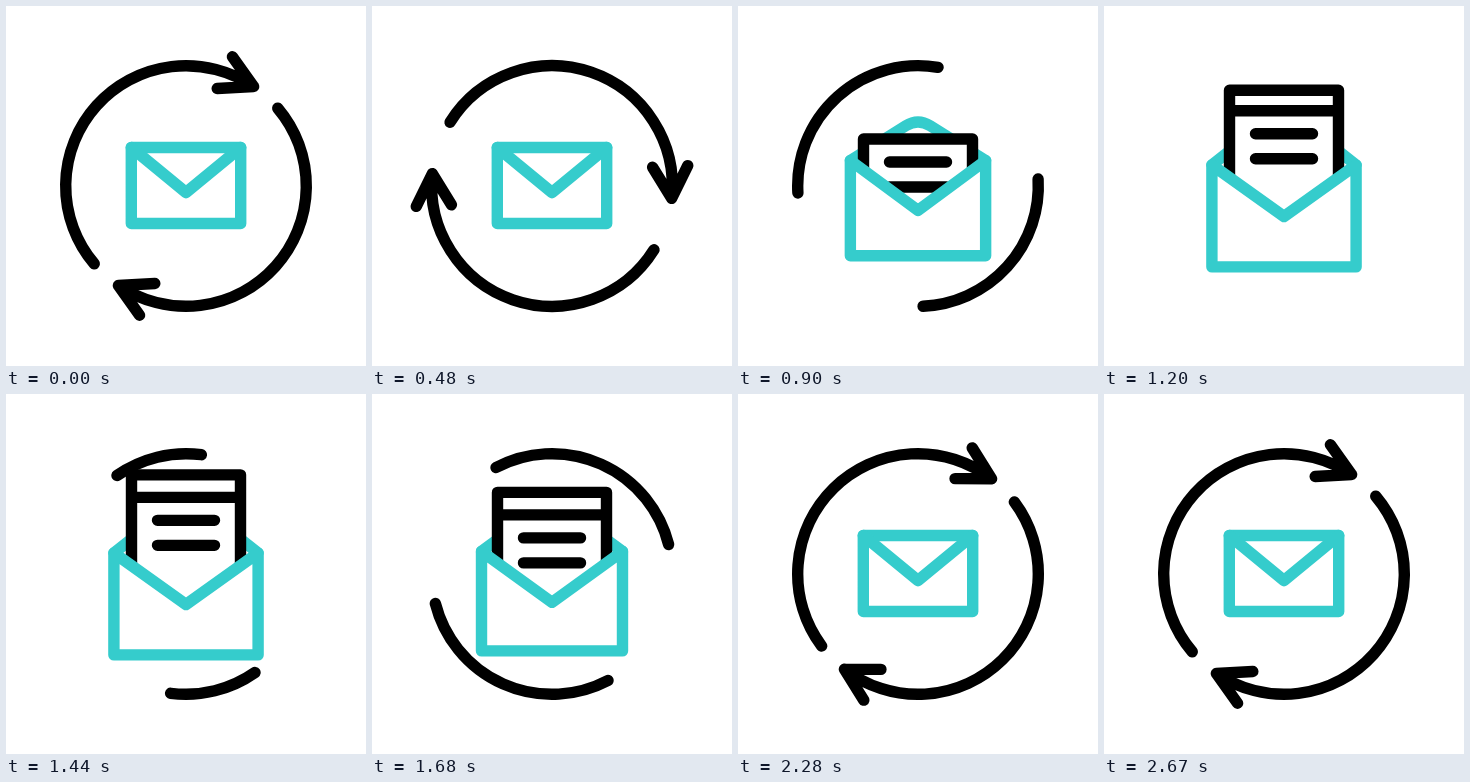
These frames come from a looping animation (360x360 px, 2700 ms). An HTML page:

```html
<!DOCTYPE html>
<html lang="en">
<head>
<meta charset="utf-8">
<title>Mail sync</title>
<style>
  html, body { margin: 0; width: 100%; height: 100%; overflow: hidden; background: #fff; }
  svg { display: block; width: 100%; height: 100%; }
  path { fill: none; stroke: #000; stroke-width: 11.4; stroke-linecap: round; stroke-linejoin: round; }
  .teal { stroke: #35cccc; }
  .solid { fill: #fff; }
  #sheet { stroke-linecap: butt; }
</style>
</head>
<body>
<svg viewBox="0 0 360 360">
  <path id="arcA"/>
  <path id="arcB"/>
  <path id="flap" class="teal solid"/>
  <g id="paper">
    <path id="sheet" class="solid"/>
    <path id="lines"/>
  </g>
  <path id="body" class="teal solid"/>
</svg>
<script>
const LOOP = 2700, C = 180, R = 120.3;
const TAIL = 139.7, SPAN = 164.5;   // resting arc, degrees clockwise from the right
const $ = id => document.getElementById(id);
const draw = (id, d) => $(id).setAttribute('d', d);

// Progress 0..1 from time a to b: linear, eased, or eased there and back.
const ramp = (t, a, b) => Math.min(1, Math.max(0, (t - a) / (b - a)));
const ease = (t, a, b) => { const u = ramp(t, a, b); return u * u * (3 - 2 * u); };
const visit = (t, a, b, c, d) => ease(t, a, b) - ease(t, c, d);

function polar(x, y, r, deg) {
  const a = deg * Math.PI / 180;
  return [x + r * Math.cos(a), y + r * Math.sin(a)];
}

function arrow(tail, tip, size) {
  if (tip - tail < 0.5) return '';
  const from = polar(C, C, R, tail), to = polar(C, C, R, tip);
  let d = `M${from}A${R} ${R} 0 ${tip - tail > 180 ? 1 : 0} 1 ${to}`;
  if (size > 0.02) {
    const arm = turn => polar(...to, 36.5 * size, tip + turn);
    d += `M${arm(232.6)}L${to}L${arm(290.3)}`;
  }
  return d;
}

function drawArrows(t) {
  let tail, tip, size, lead = 0;
  if (t < 1200) {
    // The tail speeds up and catches the tip.
    tail = TAIL + 325 * (t / 1135) ** 1.75;
    tip = TAIL + SPAN + 163 * ease(t, 0, 1150);
    lead = 12 * ease(t, 480, 900);
    size = 1 - ease(t, 540, 780);
  } else {
    // The arc grows while it swings past its resting place and settles back.
    tail = TAIL + 95.3 + 92 * ease(t, 1621, 1969) - 7.3 * ease(t, 2050, 2500);
    tip = tail + SPAN * ramp(t, 1275, 1920);
    size = 1 - (1 - ramp(t, 1860, 2220)) ** 3;
  }
  draw('arcA', arrow(tail, tip, size));
  draw('arcB', arrow(tail + 180, tip + 180 + lead, size));
}

function drawMail(t) {
  const p = visit(t, 600, 1050, 1605, 2010);
  const half = 54.7 + 17.4 * p, left = C - half, right = C + half;
  const top = 141.5 + 17.5 * p, fold = 186.5 + 24 * p, bottom = 217.5 + 43.4 * p;
  const peak = 57 * p, k = 0.18;
  const shoulder = top - peak * (1 - k);
  draw('flap', `M${left} ${top}L${C - half * k} ${shoulder}Q${C} ${top - peak} ${C + half * k} ${shoulder}L${right} ${top}`);
  draw('body', `M${left} ${top}L${C} ${fold}L${right} ${top}V${bottom}H${left}Z`);

  $('paper').style.display = p > 0.05 ? '' : 'none';
  const y = 142.8 - 40 * visit(t, 725, 1273, 1400, 2000);
  const gap = 22.5 * visit(t, 900, 1270, 1700, 1890);
  const text = y + 47 - 24 * visit(t, 600, 840, 1700, 2000);
  const end = top + 16;
  draw('sheet', `M125.5 ${end}V${y - gap}H234.5V${end}M125.5 ${y}H234.5`);
  draw('lines', `M151.5 ${text}H208.5M151.5 ${text + 25}H208.5`);
}

const start = performance.now();
function frame() {
  const t = (performance.now() - start) % LOOP;
  drawArrows(t);
  drawMail(t);
  requestAnimationFrame(frame);
}
frame();
</script>
</body>
</html>
```
